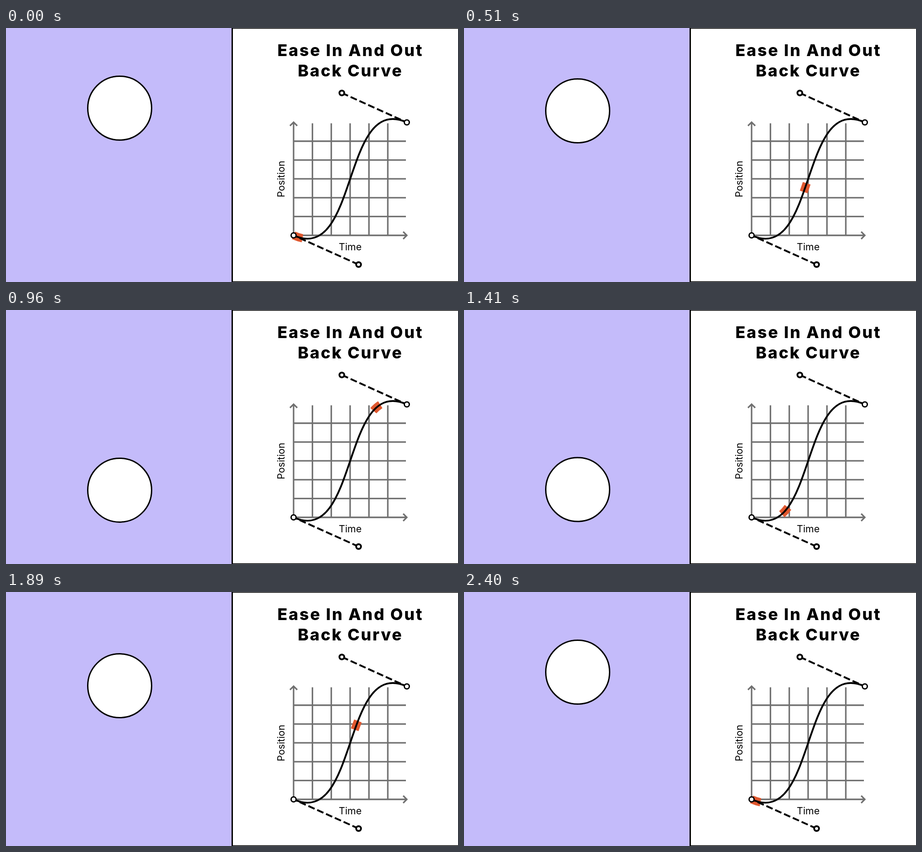
Write an HTML page that moves like this. It is 998x561 px and loops after 2430 ms.

```html
<!DOCTYPE html>
<html lang="en">
<meta charset="utf-8">
<title>Ease in and out back</title>
<style>
  html, body { margin: 0; height: 100%; overflow: hidden; background: #c4bbfa; }
  svg { display: block; width: 100vw; height: 100vh; }
  text { font-family: Inter, sans-serif; text-anchor: middle; }
  .title { font-size: 36px; font-weight: 800; letter-spacing: 2.8px; }
  .label { font-size: 21.5px; }
  .line { fill: none; stroke: #000; stroke-width: 4; }
  .grid { fill: none; stroke: #707070; stroke-width: 3.3; }
  .dot { fill: #fff; stroke: #000; }
</style>
<svg viewBox="0 0 998 561">
  <rect x="499.5" y="0" width="600" height="561" fill="#fff" stroke="#000" stroke-width="3"/>
  <circle id="ball" class="dot" cx="251" cy="177" r="70.5" stroke-width="3"/>

  <text class="title" x="760.4" y="62.3">Ease In And Out</text>
  <text class="title" x="760.4" y="107.3">Back Curve</text>
  <text class="label" x="760" y="490.5">Time</text>
  <text class="label" transform="translate(615 333.5) rotate(-90)">Position</text>

  <path id="grid" class="grid"/>
  <path class="grid" d="M635 458V209M627 216l8-8 8 8M635 458H884M877 450l8 8-8 8"/>
  <path id="marker" class="line" pathLength="1" style="stroke:#e0582f;stroke-width:18" stroke-dasharray=".05 .95"/>
  <path class="line" stroke-dasharray="15 6.3" d="M741.5 143.5L885 208.5M778.5 522.5L635 458"/>
  <path id="curve" class="line"/>
  <g class="dot">
    <circle cx="635" cy="458" r="5.5" stroke-width="3"/>
    <circle cx="885" cy="208.5" r="5.5" stroke-width="3"/>
    <circle cx="741.5" cy="143.5" r="5.3" stroke-width="4"/>
    <circle cx="778.5" cy="522.5" r="5.3" stroke-width="4"/>
  </g>
</svg>
<script>
  const HALF = 1200, LOOP = 2430, STEP = 30;
  const TOP = 177, BOTTOM = 391;
  const $ = id => document.getElementById(id);

  let lines = '';
  for (let i = 1; i < 6; i++) {
    const offset = i * 41.6;
    lines += `M${635 + offset} 458V210.5M635 ${458 - offset}H883`;
  }
  $('grid').setAttribute('d', lines);
  for (const id of ['curve', 'marker'])
    $(id).setAttribute('d', 'M635 458C778.5 522.5 741.5 143.5 885 208.5');

  const cubic = (a, b, s) => 3 * a * s * (1 - s) ** 2 + 3 * b * (1 - s) * s * s + s ** 3;

  function bezierEase(x1, y1, x2, y2) {
    return p => {
      let low = 0, high = 1;
      for (let i = 0; i < 24; i++) {
        const mid = (low + high) / 2;
        if (cubic(x1, x2, mid) < p) low = mid; else high = mid;
      }
      return cubic(y1, y2, low);
    };
  }
  const fall = bezierEase(.857, -.5, .165, 1.3);
  const rise = bezierEase(.857, -.26, .226, 1.5);

  function draw(now) {
    const t = Math.floor(now % LOOP / STEP) * STEP;
    const p = t % HALF / HALF;
    const progress = t < HALF ? fall(p) : t < 2 * HALF ? 1 - rise(p) : 0;
    $('ball').setAttribute('cy', TOP + (BOTTOM - TOP) * progress);
    $('marker').setAttribute('stroke-dashoffset', -p);
    requestAnimationFrame(draw);
  }
  const start = performance.now();
  requestAnimationFrame(function first() { draw(performance.now() - start); });
</script>
</html>
```
